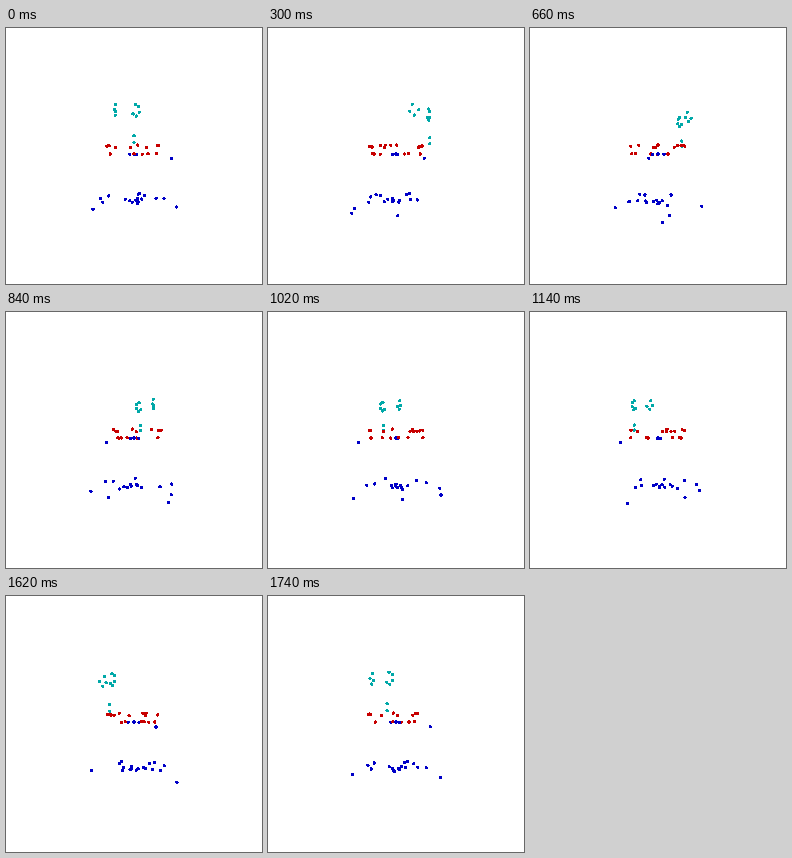
These frames come from a looping animation (256x256 px, 1800 ms). A matplotlib script:

```python
import numpy as np
import matplotlib.pyplot as plt
from matplotlib.animation import FuncAnimation

SIZE, DPI = 256, 100
FRAMES, STEP = 30, 60
DEPTH = 205          # camera distance from the spin axis
MID = SIZE / 2
CYAN, RED, BLUE = (0, 0.66, 0.66), (0.78, 0, 0), (0, 0, 0.78)


def ring(radius, height, degrees):
    """Markers at one height around the spin axis; 0 degrees faces the camera."""
    a = np.radians(np.atleast_1d(degrees))
    return np.column_stack([radius * np.sin(a), radius * np.cos(a),
                            np.full(a.size, height)])


def loop(center, radii, degrees):
    """Upright ellipse of markers."""
    a = np.radians(degrees)
    return center + np.column_stack([np.cos(a), np.cos(a), np.sin(a)]) * radii


# Arcs a:b:nj hold n evenly spaced angles.
head = np.vstack([
    ring(35.7, 16.7, 0), ring(35.7, 11.1, 0),
    loop((1.5, 34, 38.3), (3, 0, 5), np.r_[220:455:5j]),
    loop((-16.2, 27.5, 40.4), (0, 4.5, 5), np.r_[115:348:4j]),
])
chest = np.vstack([
    ring(27, 9.5, np.r_[-91:-59:4j, 7, 53:59:2j, 149:228:3j]),
    ring(27, 2.1, np.r_[50, 160:179:2j, 247]),
    ring(14, 2.1, np.r_[0:80:2j]),
])
legs = np.vstack([
    ring(38, -2.5, 65),
    ring(6, 1.7, np.r_[-44:157:2j]), ring(0, 2, 0),
    ring(44, -52.3, np.r_[97:233:2j]),
    ring(43, -47.2, np.r_[163, 240:302:2j]),
    ring(30, -42.5, np.r_[90:244:3j]),
    ring(22, -42.2, np.r_[8:168:3j]),
    ring(12.3, -45, np.r_[139:164:2j, 228]),
    ring(4.5, -45.2, np.r_[-112:153:4j]),
])

points = np.vstack([head, chest, legs])
colors = np.repeat([CYAN, RED, BLUE],
                   [len(head), len(chest), len(legs)], axis=0)


def project(angle):
    side, front, height = points.T
    x = side * np.cos(angle) + front * np.sin(angle)
    z = front * np.cos(angle) - side * np.sin(angle)
    scale = DEPTH / (DEPTH - z)
    return np.column_stack([MID + x * scale, MID - height * scale]), z


fig = plt.figure(figsize=(SIZE / DPI, SIZE / DPI), dpi=DPI, facecolor="white")
ax = fig.add_axes([0, 0, 1, 1])
ax.set_xlim(0, SIZE)
ax.set_ylim(SIZE, 0)
ax.axis("off")
dots = ax.scatter(points[:, 0], points[:, 1], s=(2.2 * 72 / DPI) ** 2,
                  marker="o", c=colors, linewidths=0, antialiased=False)


def update(frame):
    xy, z = project(2 * np.pi * frame / FRAMES)
    order = np.argsort(z)
    dots.set_offsets(xy[order])
    dots.set_facecolors(colors[order])
    return (dots,)


anim = FuncAnimation(fig, update, frames=FRAMES, interval=STEP, repeat=True,
                     repeat_delay=0, blit=False)
plt.show()
```
